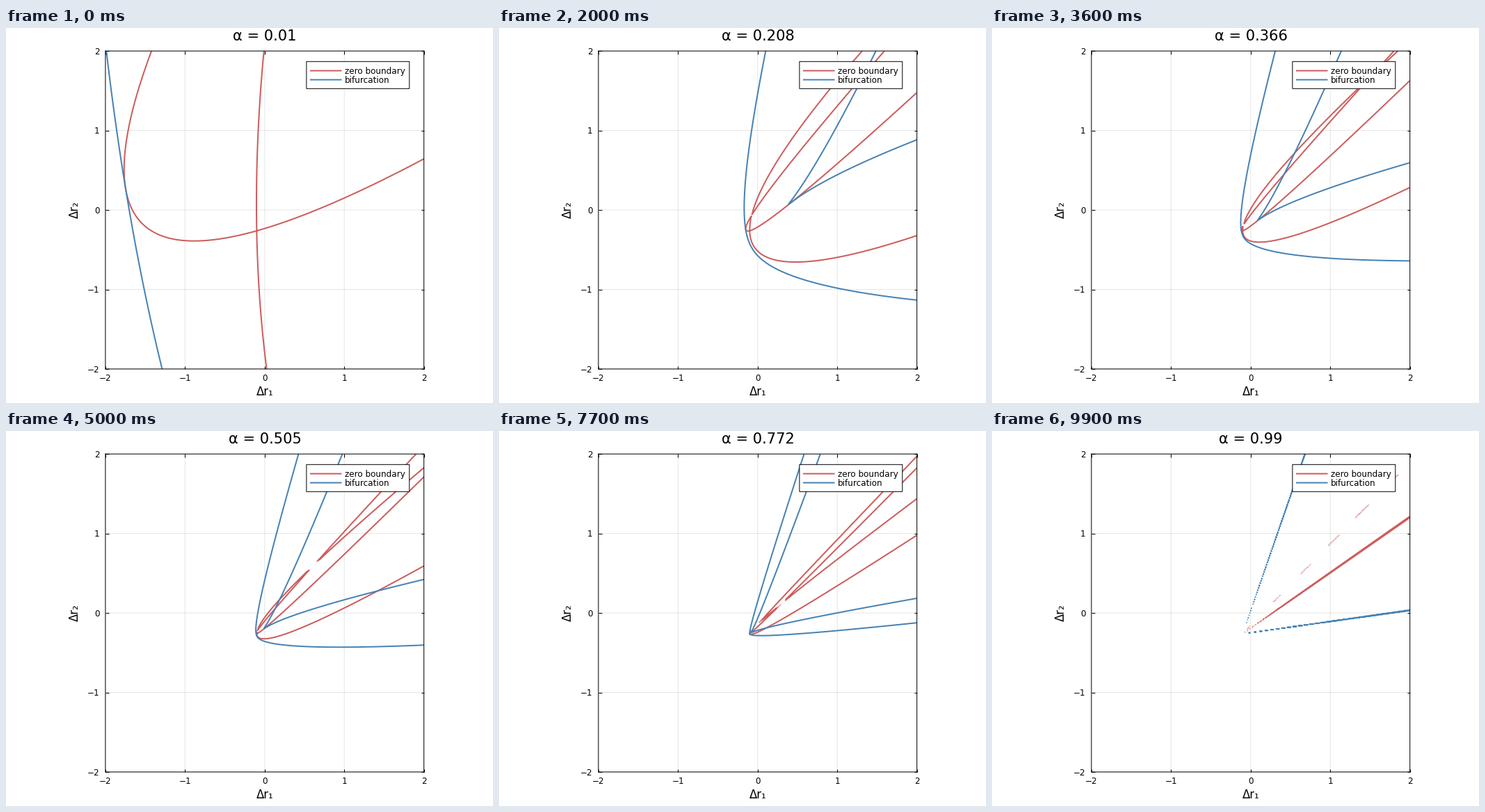
Write a matplotlib script that moves like this. It is 700 by 540 pixels and loops after 10000 ms.

```python
import numpy as np
import matplotlib.pyplot as plt
from matplotlib.animation import FuncAnimation
from matplotlib.lines import Line2D
from matplotlib.patches import Rectangle
from matplotlib.transforms import Affine2D

plt.rcParams["font.family"] = "DejaVu Sans"
plt.rcParams["path.simplify"] = False  # keeps the tiny contour islands

W, H, DPI = 700, 540, 100
FRAMES = 100
RED, BLUE = "indianred", "steelblue"
LEFT, RIGHT, TOP, BOTTOM = 142.9, 600.7, 33.1, 491
PX = 72 / DPI

# Equilibria: c + k (a1 u + a2 w) + b1 u^2 + b2 w^2 + d u w = (x, y)
C = np.array([-0.1, -0.262])
A1, B1 = np.array([-0.2607, -0.0732]), np.array([1, 1.028])
A2, B2 = np.array([-0.0115, 0.604]), np.array([1, 0.70])
D = np.array([-0.9577, 1.2732])

grid = np.linspace(-2, 2, 401)
X, Y = np.meshgrid(grid, grid)
alphas = np.linspace(0.01, 0.99, FRAMES)


def parabola(k, a, b):
    """Implicit form of the curve c + k a t + b t^2."""
    x, y = X - C[0], Y - C[1]
    scale = k * (a[1] - b[1] * a[0])
    t = y - b[1] * x
    return x * scale**2 - k * a[0] * t * scale - t**2


def zero_boundary(k):
    return parabola(k, A1, B1) * parabola(k, A2, B2)


def bifurcation(k):
    """Discriminant of det(s Q1 + Q2) for the pencil of the two conics."""
    mul = np.polymul
    h, f, g = D / 2, k * A1 / 2, k * A2 / 2
    m = mul(B1, B2) - mul(h, h)
    r = mul(B1, mul(g, g)) - 2 * mul(h, mul(f, g)) + mul(B2, mul(f, f))
    e1, e2 = C[0] - X, C[1] - Y
    p = m[0] * e1 - r[0]
    q = m[0] * e2 + m[1] * e1 - r[1]
    s = m[1] * e2 + m[2] * e1 - r[2]
    t = m[2] * e2 - r[3]
    qq, ss, pt = q * q, s * s, p * t
    return 18 * pt * q * s - 4 * qq * q * t + qq * ss - 4 * p * ss * s - 27 * pt * pt


fig = plt.figure(figsize=(W / DPI, H / DPI), dpi=DPI, facecolor="white")
pixels = Affine2D().scale(1 / W, -1 / H).translate(0, 1) + fig.transFigure

ax = fig.add_axes([LEFT / W, 1 - BOTTOM / H, (RIGHT - LEFT) / W, (BOTTOM - TOP) / H])
ax.set(xlim=(-2, 2), ylim=(-2, 2), xticks=range(-2, 3), yticks=range(-2, 3))
ax.set_axisbelow(True)
ax.grid(color="black", alpha=0.1, linewidth=PX)
ax.tick_params(direction="in", top=True, right=True, length=4.5 * PX, width=PX,
               labelbottom=False, labelleft=False)
for spine in ax.spines.values():
    spine.set_linewidth(PX)
for line in [*ax.spines.values(), *ax.get_xgridlines(), *ax.get_ygridlines()]:
    line.set_snap(False)


def label(x, y, text, size, ha="center", rotation=0):
    return fig.text(x, y, text, fontsize=size * PX, ha=ha, va="baseline",
                    rotation=rotation, rotation_mode="anchor", transform=pixels)


for v in range(-2, 3):
    name = str(v).replace("-", "\u2212")
    part = (v + 2) / 4
    label(LEFT + part * (RIGHT - LEFT), 508, name, 12)
    label(134.3, BOTTOM - part * (BOTTOM - TOP) + 4.5, name, 12, ha="right")
label(372, 529, "Δr₁", 16.5)
label(103.5, 262, "Δr₂", 16.5, rotation=90)
title = label(372, 18.3, "", 21)

fig.add_artist(Rectangle((431.9, 48.3), 147.9, 39, facecolor="white", edgecolor="black",
                         linewidth=PX, snap=False, transform=pixels))
for y, color, name in ((61.5, RED, "zero boundary"), (74.5, BLUE, "bifurcation")):
    fig.add_artist(Line2D([438, 481.5], [y, y], color=color, linewidth=2 * PX,
                          snap=False, transform=pixels))
    label(486.8, y + 4.5, name, 12, ha="left")

curves = []


def update(i):
    while curves:
        curves.pop().remove()
    alpha = alphas[i]
    k = (1 - alpha) / np.sqrt(alpha)
    for field, color in ((zero_boundary, RED), (bifurcation, BLUE)):
        curve = ax.contour(grid, grid, field(k), levels=[0], colors=[color],
                           linewidths=2 * PX)
        curve.set(joinstyle="round", snap=False)
        curves.append(curve)
    title.set_text(f"α = {round(float(alpha), 3)}")
    return []


anim = FuncAnimation(fig, update, frames=FRAMES, interval=100, repeat=True,
                     repeat_delay=0, blit=False)
plt.show()
```
